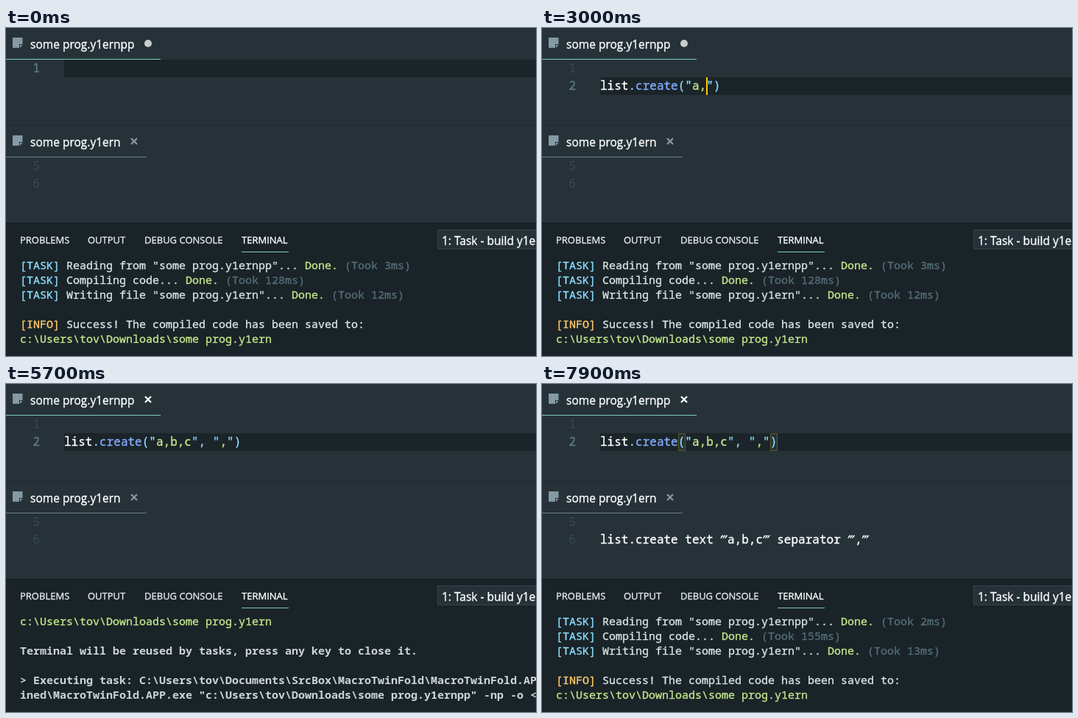
Recreate the animation shown at these times as an HTML page with a canvas. Size 720x446 px, loop 8000 ms.

```html
<!DOCTYPE html>
<html lang="en">
<head>
<meta charset="utf-8">
<title>Editor and terminal</title>
<style>
  html, body { margin: 0; width: 100%; height: 100%; overflow: hidden; background: #263238; }
  canvas { display: block; width: 720px; height: 446px; }
</style>
</head>
<body>
<canvas id="stage" width="720" height="446"></canvas>
<script>
const ctx = document.getElementById("stage").getContext("2d");
const LOOP = 8000;
const CELL = 9.61, LEFT = 79, LINE = 24, TOP = 43;
const MONO = '"Noto Sans Mono", "DejaVu Sans Mono", monospace';
const PRIME = '"DejaVu Sans Mono", monospace';
const UI = '"Open Sans", "Noto Sans", sans-serif';
const C = {
  bg: "#263238", dark: "#1a2327", row: "#1b2428", teal: "#80cbc4", white: "#ffffff",
  cyan: "#89ddff", blue: "#82aaff", green: "#c3e88d", yellow: "#ffcb6b",
  cursor: "#ffcc00", dim: "#546e7a", faint: "#37474f", number: "#607d8b", text: "#dbe4e6"
};
const FILE = "some prog.y1ern";
const FULL = 'list.create("a,b,c", ",")';
const HOME = "c:\\Users\\tov\\Downloads\\";

// time, code, caret column, caret visible, brackets marked, current line
const edits = [
  [0, "", 0, 0, 0, 0],
  [300, "", 0, 1, 0, 0],
  [800, "", 0, 0, 0, 0],
  [900, "", 0, 1],
  [1100, "l", 1, 1],
  [1300, "li", 2, 1],
  [1400, "list", 4, 1],
  [1500, "list.", 5, 1],
  [1700, "list.c", 6, 1],
  [1900, "list.cr", 7, 1],
  [2000, "list.cre", 8, 1],
  [2100, "list.crea", 9, 1],
  [2200, "list.creat", 10, 1],
  [2300, "list.create", 11, 1],
  [2400, "list.create()", 12, 1],
  [2500, "list.create()", 12, 1, 1],
  [2600, 'list.create("")', 13, 1],
  [2800, 'list.create("a")', 14, 1],
  [3000, 'list.create("a,")', 15, 1],
  [3300, 'list.create("a,b")', 16, 1],
  [3500, 'list.create("a,b,")', 17, 1],
  [3700, 'list.create("a,b,c")', 18, 1],
  [4000, 'list.create("a,b,c")', 19, 1, 1],
  [4200, 'list.create("a,b,c",)', 20, 1, 1],
  [4300, 'list.create("a,b,c", )', 21, 1, 1],
  [4600, 'list.create("a,b,c", "")', 22, 1],
  [4900, FULL, 23, 1],
  [5400, FULL, 23, 0],
  [6200, FULL, 23, 1],
  [6700, FULL, 23, 0],
  [7200, FULL, 24, 1],
  [7300, FULL, 24, 1, 1],
  [7500, FULL, 25, 1, 1],
  [7900, FULL, 25, 0, 1]
];

// time, first visible terminal row, number of rows printed
const scrolls = [[0, 0, 6], [5600, 5, 11], [5800, 7, 13], [5900, 8, 14], [6000, 12, 18]];

const task = (body, took) =>
  [["[TASK] ", C.cyan], [body + "... ", C.text], ["Done. ", C.green], [`(Took ${took}ms)`, C.dim]];
const report = (read, compile, write) => [
  task(`Reading from "${FILE}pp"`, read),
  task("Compiling code", compile),
  task(`Writing file "${FILE}"`, write),
  [],
  [["[INFO] ", C.yellow], ["Success! The compiled code has been saved to:", C.text]],
  [[HOME + FILE, C.green]]
];
const strong = s => [[s, "#ccd4d6", "bold"]];
const log = [
  ...report(3, 128, 12),
  [],
  strong("Terminal will be reused by tasks, press any key to close it."),
  [],
  strong("> Executing task: C:\\Users\\tov\\Documents\\SrcBox\\MacroTwinFold\\MacroTwinFold.APP"),
  strong(`ined\\MacroTwinFold.APP.exe "${HOME}${FILE}pp" -np -o <`),
  [],
  ...report(2, 155, 13)
];

const at = (list, t) => list.filter(e => e[0] <= t).pop();

function rect(x, y, w, h, color) {
  ctx.fillStyle = color;
  ctx.fillRect(x, y, w, h);
}

// Fills text and adds a hairline outline for a slightly heavier weight.
function ink(s, x, y, font, color, outline = 0.35) {
  ctx.font = font;
  ctx.fillStyle = ctx.strokeStyle = color;
  ctx.fillText(s, x, y);
  if (!outline) return;
  ctx.lineWidth = outline;
  ctx.lineJoin = "round";
  ctx.strokeText(s, x, y);
}

function label(s, x, y, size, color = C.white) {
  ink(s, x, y, `${size}px ${UI}`, color);
}

// Places characters on a fixed grid; color may depend on the column.
function grid(s, x, y, cell, color, weight = "") {
  const size = cell / 0.6;
  [...s].forEach((ch, i) => {
    const fill = typeof color === "function" ? color(i) : color;
    const left = x + i * cell;
    if (ch === "‴") ink(ch, left - cell * 0.12, y + 3, `${size * 1.25}px ${PRIME}`, fill);
    else if (ch !== " ") ink(ch, left, y, `${weight} ${size}px ${MONO}`, fill, weight ? 0 : 0.35);
  });
}

function cross(x, y, color) {
  ctx.strokeStyle = color;
  ctx.lineWidth = 2.2;
  ctx.beginPath();
  ctx.moveTo(x - 4, y - 4); ctx.lineTo(x + 4, y + 4);
  ctx.moveTo(x + 4, y - 4); ctx.lineTo(x - 4, y + 4);
  ctx.stroke();
}

function poly(color, ...pts) {
  ctx.fillStyle = color;
  ctx.beginPath();
  pts.forEach(([x, y]) => ctx.lineTo(x, y));
  ctx.fill();
}

function tab(y, name, width, underline) {
  poly("#8399a4", [9, y + 13], [22.5, y + 13], [22.5, y + 22], [18, y + 22], [18, y + 27], [9, y + 27]);
  poly("#8399a4", [19, y + 23], [22.5, y + 23], [19, y + 27]);
  label(name, 33, y + 28, 15.5);
  rect(0, y + 42, width, 1, underline);
}

function lineNumber(n, y, color) {
  grid(String(n), 36.5, y, CELL, color);
}

function codeColors(code) {
  let quoted = false;
  const called = code.includes("(");
  return [...code].map((ch, i) => {
    if (ch === '"') { quoted = !quoted; return C.cyan; }
    if (quoted) return C.green;
    if (i < 4) return C.white;
    if (i === 4) return code.length > 5 ? C.cyan : C.white;
    if (i < 11) return called ? C.blue : C.white;
    return C.cyan;
  });
}

function bracket(col) {
  const x = Math.round(LEFT + col * CELL), y = TOP + LINE;
  rect(x, y, 10, LINE, C.bg);
  ctx.strokeStyle = "#615726";
  ctx.lineWidth = 1;
  ctx.strokeRect(x + 0.5, y + 0.5, 9, LINE - 1);
}

function upperEditor(t) {
  const [, code, col, caret, marked, line = 1] = at(edits, t);
  const y = TOP + line * LINE;
  rect(LEFT, y, 720 - LEFT, LINE, C.row);
  for (let i = 0; i <= line; i++)
    lineNumber(i + 1, 60 + i * LINE, i === line ? C.number : C.faint);
  if (marked) { bracket(11); bracket(code.length - 1); }
  const colors = codeColors(code);
  grid(code, LEFT, 84, CELL, i => colors[i]);
  if (caret) rect(Math.round(LEFT + col * CELL), y, 2, LINE, C.cursor);

  tab(0, FILE + "pp", 210, C.teal);
  if (t >= 5500) {
    cross(193, 21, C.white);
  } else {
    ctx.fillStyle = "#c8cccd";
    ctx.beginPath();
    ctx.arc(193, 21, 5, 0, 2 * Math.PI);
    ctx.fill();
  }
}

function lowerEditor(t) {
  rect(0, 132, 720, 1, "#1f2a2f");
  tab(133, FILE, 191, "#6b8082");
  cross(174, 154, "#8b989d");
  lineNumber(5, 193, C.faint);
  lineNumber(6, 217, C.faint);
  if (t >= 6200) grid("list.create text ‴a,b,c‴ separator ‴,‴", LEFT, 217, CELL, C.white);
}

function panel(t) {
  rect(0, 265, 720, 181, C.dark);
  rect(0, 265, 720, 1, "#12191c");
  [["PROBLEMS", 19], ["OUTPUT", 111], ["DEBUG CONSOLE", 188], ["TERMINAL", 320]]
    .forEach(([s, x]) => label(s, x, 293, 13, x === 320 ? C.white : "#e6ecee"));
  rect(320, 304, 64, 1, C.teal);

  rect(586, 274, 140, 27, C.bg);
  ctx.strokeStyle = "#36444b";
  ctx.lineWidth = 1;
  ctx.strokeRect(586.5, 274.5, 140, 26);
  label("1: Task - build y1ern", 592, 295, 15.5);

  const [, first, end] = at(scrolls, t);
  log.slice(first, Math.min(first + 6, end)).forEach((runs, row) => {
    let x = 19;
    for (const [s, color, weight] of runs) {
      grid(s, x, 328 + row * 20, 9, color, weight);
      x += s.length * 9;
    }
  });
}

function draw(now) {
  const t = now % LOOP;
  rect(0, 0, 720, 446, C.bg);
  upperEditor(t);
  lowerEditor(t);
  panel(t);
  requestAnimationFrame(draw);
}
requestAnimationFrame(draw);
</script>
</body>
</html>
```
